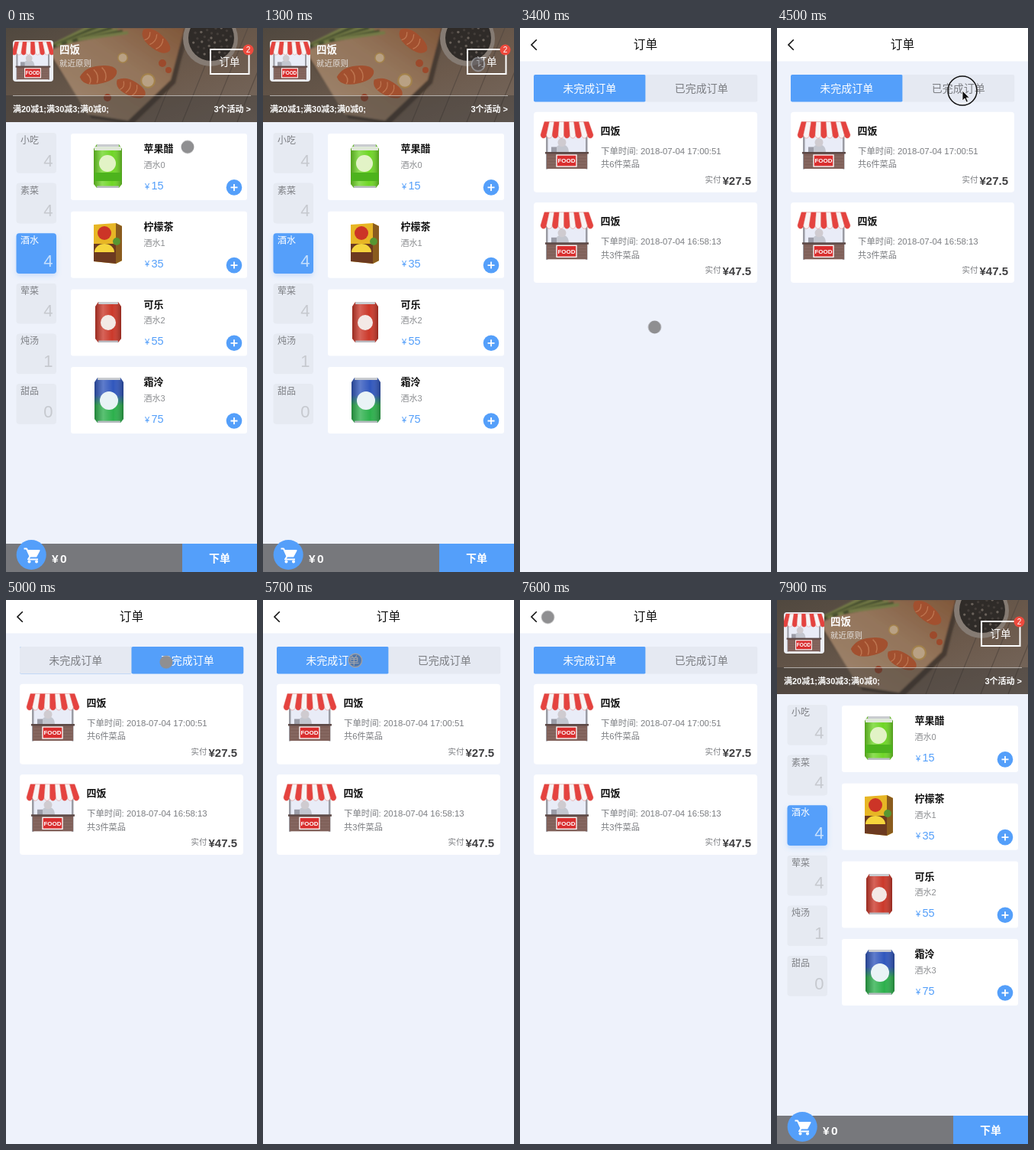
An HTML page for the animation above (8 s loop, 329 by 711 pixels).

```html
<!DOCTYPE html>
<html lang="zh-CN">
<head>
<meta charset="utf-8">
<title>点餐</title>
<style>
html, body { margin: 0; width: 100%; height: 100%; overflow: hidden; background: #eef2fb; }
svg { display: block; width: 329px; height: 711px; }
text { font-family: "Liberation Sans", "Noto Sans CJK SC", "Noto Sans CJK", sans-serif; }
.b { font-weight: 700; }

#orders, #done, #dot, #press, #click { animation: 8s step-end infinite; }
#orders { animation-name: orders; }
#done { animation-name: done; }
#dot { animation-name: dot; }
#press { animation-name: press; }
#click { animation-name: click; }
#pointer { animation: move 8s ease-in-out infinite; }

@keyframes orders { 0%, 97.5% { visibility: hidden } 20% { visibility: visible } }
@keyframes done { 0%, 70% { opacity: 0 } 58.75% { opacity: 1 } }
@keyframes dot {
  0%, 18.75%, 58.75%, 72.5% { opacity: 1 }
  15.5%, 55.5%, 70%, 97.5% { opacity: 0 }
}
@keyframes press { 0%, 18.75%, 72.5% { opacity: 0 } 15.5%, 70% { opacity: 1 } }
@keyframes click { 0%, 58.75% { opacity: 0 } 55.5% { opacity: 1 } }
@keyframes move {
  0%, 3% { transform: translate(238px, 155.5px) }
  15%, 20% { transform: translate(282px, 47.5px) }
  24.5%, 46.25% { transform: translate(176.5px, 391px) }
  54%, 59% { transform: translate(243px, 82px) }
  68.75%, 79% { transform: translate(121px, 79px) }
  88.75%, 91.5% { transform: translate(20px, 22px) }
  95%, 100% { transform: translate(36.5px, 22.5px) }
}
</style>
</head>
<body>
<svg viewBox="0 0 329 711">
  <defs>
    <clipPath id="headClip"><rect width="329" height="123"/></clipPath>
    <clipPath id="avatarClip"><rect x="9" y="16" width="53" height="54" rx="4"/></clipPath>
    <filter id="glow" x="-30%" y="-30%" width="160%" height="170%">
      <feDropShadow dx="0" dy="3" stdDeviation="3" flood-color="#549ffa" flood-opacity=".25"/>
    </filter>
    <filter id="soft"><feGaussianBlur stdDeviation="1.2"/></filter>
    <linearGradient id="fizz" x2="0" y2="1">
      <stop offset=".38" stop-color="#3157bd"/><stop offset=".62" stop-color="#2cb04c"/>
    </linearGradient>
    <linearGradient id="wood" x2="1" y2="1">
      <stop stop-color="#50483f"/><stop offset=".6" stop-color="#6c5a4c"/><stop offset="1" stop-color="#77695f"/>
    </linearGradient>
    <linearGradient id="board" y1="1" x2="1" y2="0">
      <stop stop-color="#a08871"/><stop offset=".6" stop-color="#93745a"/><stop offset="1" stop-color="#80573a"/>
    </linearGradient>
    <linearGradient id="shine">
      <stop stop-opacity=".25"/><stop offset=".3" stop-color="#fff" stop-opacity=".22"/>
      <stop offset=".65" stop-color="#fff" stop-opacity="0"/><stop offset="1" stop-opacity=".28"/>
    </linearGradient>
    <g id="stall"></g>
  </defs>
  <g id="home"></g>
  <g id="orders"></g>
  <g id="pointer">
    <circle id="dot" r="8.5" fill="#8f8f91"/>
    <circle id="press" r="8.7" fill="#505058" fill-opacity=".5" stroke="#a0a0a4" stroke-width="1.4"/>
    <g id="click">
      <circle r="19" fill="none" stroke="#111" stroke-width="1.5"/>
      <path d="M0 0v13l3-3 2.2 5 2.2-1-2.2-4.8h4.2z" fill="#111" stroke="#fff" stroke-width=".8"/>
    </g>
  </g>
</svg>
<script>
const BLUE = '#549ffa';
const $ = id => document.getElementById(id);
const times = (n, fn) => Array.from({ length: n }, (_, i) => fn(i)).join('');
const rect = (x, y, w, h, fill, more = '') =>
  `<rect x="${x}" y="${y}" width="${w}" height="${h}" fill="${fill}" ${more}/>`;
const circle = (x, y, r, fill, more = '') =>
  `<circle cx="${x}" cy="${y}" r="${r}" fill="${fill}" ${more}/>`;
const path = (d, fill, more = '') => `<path d="${d}" fill="${fill}" ${more}/>`;
const line = (d, color, w = 1, more = '') =>
  path(d, 'none', `stroke="${color}" stroke-width="${w}" ${more}`);
// y is the vertical middle of the text
const text = (str, x, y, size, fill, more = '') =>
  `<text x="${x}" y="${y + size * .37}" font-size="${size}" fill="${fill}" ${more}>${str}</text>`;
const BOLD = 'class="b" ', MID = 'text-anchor="middle" ', END = 'text-anchor="end" ';

function stall() {
  const stripe = i => {
    const a = 6 + i * 58 / 9, b = 1 + i * 69 / 9, w = 69 / 9;
    return path(`M${a} 0h${58 / 9}L${b + w} 17a${w / 2} 4.5 0 0 1 ${-w} 0z`,
      i % 2 ? '#f8f4f4' : '#e5433f', 'stroke="#d8605c" stroke-width=".4"');
  };
  return rect(9, 10, 53, 34, '#e9ecf7') +
    path('M20 41c0-9 4-11 9-11s9 2 9 11z', '#c3c6cf') + circle(29, 27, 5.5, '#cfcbd0') +
    rect(15, 33, 7, 8, '#9c9da8') +
    rect(8, 18, 2.5, 44, '#9a9ba3') + rect(60, 18, 2.5, 44, '#9a9ba3') +
    rect(9, 41, 53, 20.5, '#80615a') + rect(7, 39.5, 57, 2.5, '#5c4946') +
    times(4, i => line(`M10 ${46 + i * 4}H61`, '#937770', .5)) +
    rect(22, 43.5, 26, 15, '#d92f2f', 'stroke="#fff" stroke-width="1.3"') +
    text('FOOD', 35, 51, 8, '#fff', BOLD + MID) +
    times(9, stripe);
}

function photo() {
  const salmon = (x, y, turn, size = 1) =>
    `<g transform="translate(${x} ${y}) rotate(${turn}) scale(${size})">` +
    path('M-24-4q10-11 28-8 20 3 21 12-2 11-22 11-26 0-27-15z', '#a2502f') +
    line('M-14-6q6 8 0 14M-4-9q6 9 0 18M7-9q6 9 0 18', '#bd7550', 1.5) + '</g>';
  const lemon = (x, y, r) => circle(x, y, r, '#a3824c') + circle(x, y, r * .78, '#b9a184');
  const pepper = i => {
    const a = i * 2.4, r = 4.4 * Math.sqrt(i);
    return circle(269 + r * Math.cos(a), 13 + r * Math.sin(a), 1.7, i % 3 ? '#433d39' : '#6a625b');
  };
  return `<g clip-path="url(#headClip)">` +
    rect(0, 0, 329, 123, 'url(#wood)') +
    times(6, i => line(`M${195 + i * 36} 123L${245 + i * 36} 0`, '#594c43', 1.2)) +
    '<g filter="url(#soft)">' +
    path('M112 118L166 126 222 72 240 0H130L56 34z', '#463a31') +
    path('M107 113L160 121 216 68 234 0H130L56 30z', 'url(#board)') +
    times(7, i => line(`M${52 + i * 7} ${27 - i * 2}L${118 + i * 7} ${-6 + i * 2}`,
      i % 2 ? '#454d2d' : '#737a46', 4)) +
    '</g>' +
    salmon(121, 62, -14) + salmon(163, 79, 24, .85) + salmon(196, 17, 35, .9) +
    lemon(186, 69, 10) + lemon(153, 39, 7) +
    circle(205, 46, 5, '#9c4a2c') + circle(133, 91, 5, '#96432a') + circle(213, 55, 4, '#9c4a2c') +
    circle(268, 14, 36, '#857b73') + circle(269, 13, 30, '#2f2b28') + times(38, pepper) +
    rect(0, 88, 329, 35, '#333', 'opacity=".4"') + '</g>';
}

function head() {
  return photo() +
    `<g clip-path="url(#avatarClip)">${rect(9, 16, 53, 54, '#eceef4')}
      <use href="#stall" transform="translate(7 18) scale(.8)"/></g>` +
    text('四饭', 70, 28, 13.5, '#fff', BOLD) +
    text('就近原则', 70, 46, 10.5, '#e6e3e1') +
    rect(9, 88, 312, 1, '#fff', 'opacity=".55"') +
    text('满20减1;满30减3;满0减0;', 9, 105.5, 11, '#fff', BOLD) +
    text('3个活动 &gt;', 321, 105.5, 11, '#fff', BOLD + END) +
    rect(268, 28, 50.5, 32, 'none', 'stroke="#fff" stroke-width="2"') +
    text('订单', 293, 44, 13.5, '#fff', MID) +
    circle(317.5, 28.5, 7, '#ee4a3d') + text('2', 317.5, 28.5, 10, '#fff', MID);
}

function category([name, count], i) {
  const y = 137 + i * 65.6, on = i === 2;
  return rect(13.5, y, 52.5, 52.8, on ? BLUE : '#e6eaf2', 'rx="4"' + (on ? ' filter="url(#glow)"' : '')) +
    text(name, 19, y + 9.5, 12, on ? '#fff' : '#7d7f84') +
    text(count, 61.5, y + 35.5, 22, on ? '#c5dffd' : '#c6c9cf', END);
}

function can(x, y, w, h, fill) {
  const body = `M${x + 4} ${y}h${w - 8}l4 6v${h - 11}l-4 5h${8 - w}l-4-5v${11 - h}z`;
  return path(body, fill) + path(body, 'url(#shine)') +
    rect(x + 4, y, w - 8, 3, '#c9ccd0', 'rx="1"') + rect(x + 4, y + h - 2.5, w - 8, 2.5, '#b9bcc2', 'rx="1"');
}

const pictures = [
  can(115, 152, 37, 57, '#6fd626') + rect(116, 155, 35, 5, '#dfe8d8') +
    circle(133, 177, 11, '#e2f3c6') + rect(116, 189, 35, 11, '#4db31d'),
  path('M115 257l29-2 8 4v45l-8 4-29-3z', '#e7b625') + path('M144 255l8 4v45l-8 4z', '#8a5c1e') +
    circle(129, 268, 9, '#cc3427') + path('M115 282h29v26l-29-3z', '#6c3a20') +
    path('M116 293a13 11 0 0 1 26 0z', '#f5d53c') + circle(145, 279, 5, '#579632'),
  can(117, 358, 34, 53, '#cb382a') + circle(134, 385, 10, '#f3e9e6'),
  can(116, 457, 38, 59, 'url(#fizz)') + circle(135, 487, 12, '#e9f3f6')
];

function dish([name, price], i) {
  const y = 138 + i * 101.7;
  return rect(85, y, 231, 87, '#fff', 'rx="3"') + pictures[i] +
    text(name, 180.5, y + 19.5, 13, '#111', BOLD) +
    text('酒水' + i, 180.5, y + 40.8, 11, '#8b8d90') +
    text('¥', 182, y + 68.5, 11, BLUE) + text(price, 190.5, y + 67.5, 14.5, BLUE) +
    circle(299, y + 70.4, 10.3, BLUE) +
    line(`M294.5 ${y + 70.4}h9m-4.5-4.5v9`, '#fff', 1.8);
}

function foot() {
  return rect(0, 674, 231, 37, '#77787c') + rect(231, 674, 98, 37, BLUE) +
    circle(33.2, 688.5, 19.5, BLUE) +
    line('M23.5 680.5h3.5l4.5 10h8l4-7.5h-15', '#fff', 2, 'stroke-linejoin="round"') +
    path('M28 682h16l-4.5 8.5h-8z', '#fff') +
    line('M31.5 690.5l-2.5 4h13', '#fff', 2, 'stroke-linejoin="round"') +
    circle(30.5, 697.5, 2, '#fff') + circle(40, 697.5, 2, '#fff') +
    text('¥', 60, 693.5, 15.5, '#fff', BOLD) + text('0', 71, 693.5, 15.5, '#fff', BOLD) +
    text('下单', 280, 693, 14, '#fff', BOLD + MID);
}

function tabs(active) {
  return ['未完成订单', '已完成订单'].map((name, i) => {
    const on = i === active, x = 18 + i * 146.5;
    return rect(x, 61, 146.8, 35.5, on ? BLUE : '#e5e9f2', 'rx="2"') +
      text(name, x + 73.2, 79, 14, on ? '#fff' : '#7c7e83', MID);
  }).join('');
}

function order([time, count, paid], i) {
  const y = 109.7 + i * 118.3;
  return rect(18, y, 293, 105, '#fff', 'rx="4"') +
    `<use href="#stall" x="26" y="${y + 12.8}"/>` +
    text('四饭', 105.5, y + 24, 13, '#111', BOLD) +
    text('下单时间: 2018-07-04 ' + time, 106, y + 51, 11.4, '#7b7d81') +
    text(`共${count}件菜品`, 106, y + 68.6, 11.2, '#7b7d81') +
    text('实付', 242.5, y + 88.5, 10.5, '#7b7d81') +
    text('¥' + paid, 303, y + 89.3, 15, '#3f3f41', BOLD + END);
}

$('stall').innerHTML = stall();

$('home').innerHTML = rect(0, 0, 329, 711, '#eef2fb') + head() +
  [['小吃', 4], ['素菜', 4], ['酒水', 4], ['荤菜', 4], ['炖汤', 1], ['甜品', 0]].map(category).join('') +
  [['苹果醋', 15], ['柠檬茶', 35], ['可乐', 55], ['霜泠', 75]].map(dish).join('') +
  foot();

$('orders').innerHTML = rect(0, 0, 329, 711, '#eef2fb') + rect(0, 0, 329, 43.5, '#fff') +
  line('M21.8 15.2L15 22l6.8 6.8', '#111', 1.6) +
  text('订单', 164.5, 21.5, 15.7, '#111', MID) +
  tabs(0) + `<g id="done">${tabs(1)}</g>` +
  [['17:00:51', 6, '27.5'], ['16:58:13', 3, '47.5']].map(order).join('');
</script>
</body>
</html>
```
